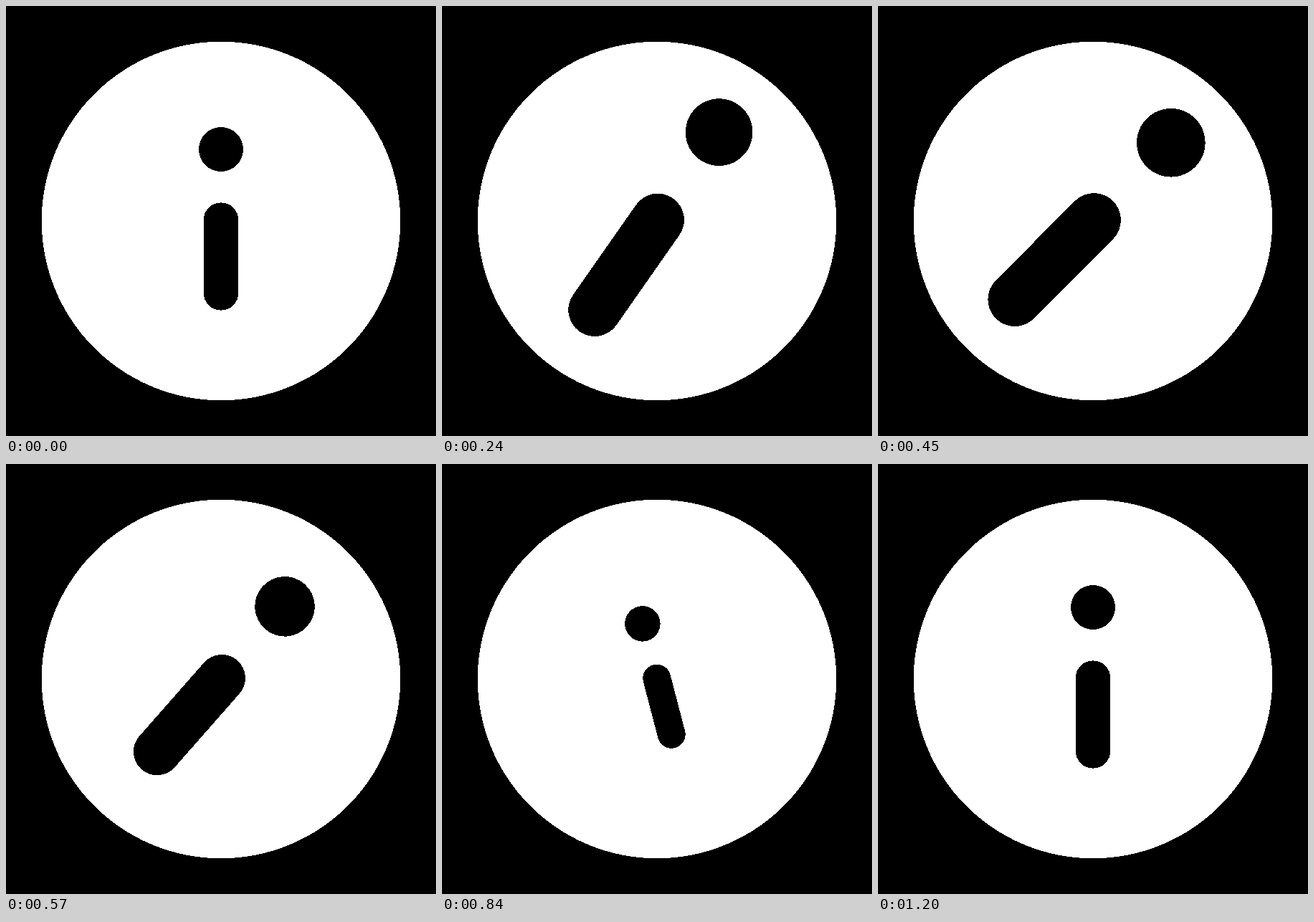
Animation of 600 by 600 pixels, one loop 3230 ms. Source, as an HTML page:

```html
<!DOCTYPE html>
<html lang="en">
<head>
<meta charset="utf-8">
<title>Info icon</title>
<style>
  html, body { margin: 0; width: 100%; height: 100%; overflow: hidden; background: #000; }
  svg { display: block; width: 100%; height: 100%; shape-rendering: crispEdges; }
  #mark { transform-origin: 0 0; }
</style>
</head>
<body>
<svg viewBox="0 0 600 600">
  <g transform="translate(300 300)">
    <circle r="250.3" fill="#fff"/>
    <g id="mark">
      <circle cy="-100" r="31"/>
      <line y1="-1.2" y2="100.2" stroke="#000" stroke-width="48.8" stroke-linecap="round"/>
    </g>
  </g>
</svg>
<script>
  const LOOP = 3230, MOVE = 1200, STEP = 30;
  const SETTLE = 'cubic-bezier(.33, 0, .67, 1)';
  const mark = document.getElementById('mark');

  function paused(keys) {
    const motion = mark.animate(keys, { duration: MOVE, fill: 'both' });
    motion.pause();
    return motion;
  }

  const motions = [
    paused([
      { offset: 0, rotate: '0deg', easing: 'cubic-bezier(.3, .12, .45, 1)' },
      { offset: 0.35, rotate: '45deg', easing: 'cubic-bezier(.88, 0, .5, 1)' },
      { offset: 0.745, rotate: '-16deg', easing: SETTLE },
      { offset: 1, rotate: '0deg' }
    ]),
    paused([
      { offset: 0, scale: 1, easing: 'cubic-bezier(.3, .59, .6, 1)' },
      { offset: 0.3, scale: 1.57, easing: 'cubic-bezier(.75, 0, .6, 1)' },
      { offset: 0.6375, scale: 0.78, easing: SETTLE },
      { offset: 1, scale: 1 }
    ])
  ];

  // The picture advances in whole steps, then rests until the loop ends
  const start = performance.now();
  function tick() {
    const ms = (performance.now() - start) % LOOP;
    const held = Math.min(MOVE, Math.floor(ms / STEP) * STEP);
    for (const motion of motions) motion.currentTime = held;
    requestAnimationFrame(tick);
  }
  tick();
</script>
</body>
</html>
```
